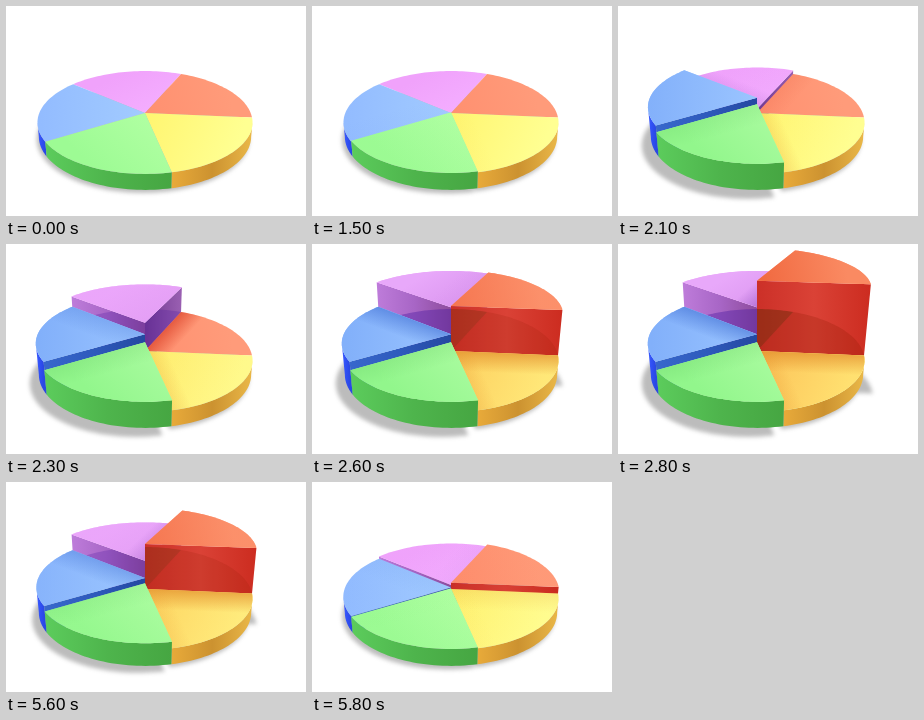
Animation, 300 px wide and 210 px high, one loop 5900 ms. Source, as an HTML page with a canvas:

```html
<!DOCTYPE html>
<html lang="en">
<head>
<meta charset="utf-8">
<title>Rising pie chart</title>
<style>
html, body { margin: 0; width: 100%; height: 100%; overflow: hidden; background: #fff; }
canvas { display: block; width: 300px; height: 210px; }
</style>
</head>
<body>
<canvas id="stage" width="300" height="210"></canvas>
<script>
const ctx = document.getElementById('stage').getContext('2d');
const LOOP = 5900, STEP = 100, RISE = 1400, STAGGER = 300, FALL = 5400, MOVE = 500;
const BASE = -14;
const VISIBLE = [190.6, 349.4]; // part of the rim that faces the viewer

// In back-to-front order. Tops run from the apex to the rim, walls from left to right.
// "behind" lists the flat sectors that show faintly through a slice's cut walls.
const slices = [
  { id: 'pink', from: 66.5, to: 139.5, lift: 42, turn: 2, shade: '#a060c8',
    rest: ['#f4adff', '#f0a2fb'], raised: ['#dc98f0', '#e8a8fa'],
    cuts: [[66.5, ['#733a92', '#9a60b2']], [139.5, ['#be7cda', '#a866c6', '#8e4c9c']]],
    behind: [['pink', '#4a1aa0', 0.4]] },
  { id: 'red', from: 355, to: 426.5, lift: 66, turn: 3, shade: '#d83c24',
    rest: ['#ff9070', '#ff9b7a'], raised: ['#f0683f', '#fa8a62'],
    cuts: [[355, ['#cc3028', '#da4236', '#cc2c20']]],
    behind: [['red', '#8c1c00', 0.24], ['pink', '#5a2800', 0.42]] },
  { id: 'yellow', from: 282, to: 355, lift: 0, shade: '#e08a28',
    rest: ['#fff570', '#ffff92'], raised: ['#fcc258', '#ffe070'],
    outer: ['#e8aa3a', '#cc9230', '#eab848'] },
  { id: 'blue', from: 139.5, to: 211.5, lift: 16.5, turn: 1, shade: '#4a78d8',
    rest: ['#a2cbff', '#93bcff'], raised: ['#9ac4ff', '#82b0fa'],
    outer: ['#3d5cff', '#3050f4', '#2a48e4'],
    cuts: [[211.5, ['#3868cc', '#2e5abc', '#2448a0']]] },
  { id: 'green', from: 211.5, to: 282, lift: 8.7, turn: 0, shade: '#5cc05c',
    rest: ['#b0ffa2', '#9dfb94'], raised: ['#a8fb9e', '#92f68c'],
    outer: ['#5ccc5c', '#4eb44c', '#46a642'] }
];
const byId = Object.fromEntries(slices.map(s => [s.id, s]));
const neighbour = (side, other, s) => slices.find(o => o[other] % 360 === s[side] % 360);

const clamp = v => Math.min(1, Math.max(0, v));
const ease = v => (1 - Math.cos(Math.PI * clamp(v))) / 2;

// Perspective view of a point on the unit disc at height z.
function project(radius, degrees, z) {
  const a = degrees * Math.PI / 180;
  const x = radius * Math.cos(a), y = radius * Math.sin(a);
  const depth = 1 + 0.184 * y - 0.0009 * z;
  return [139 + 105.7 * x / depth, 107 - (49.7 * y + z) / depth];
}

function arc(from, to, z) {
  const count = 36;
  return Array.from({ length: count + 1 }, (_, i) => project(1, from + (to - from) * i / count, z));
}

const sector = (s, z) => [project(0, 0, z), ...arc(s.from, s.to, z)];

function trace(points, dx = 0, dy = 0) {
  points.forEach(([x, y], i) => ctx[i ? 'lineTo' : 'moveTo'](x + dx, y + dy));
  ctx.closePath();
}

function paint(points, fill, alpha = 1) {
  ctx.globalAlpha = alpha;
  ctx.fillStyle = fill;
  ctx.beginPath();
  trace(points);
  ctx.fill();
  ctx.globalAlpha = 1;
}

function gradient([x0, y0], [x1, y1], colors) {
  const g = ctx.createLinearGradient(x0, y0, x1, y1);
  colors.forEach((c, i) => g.addColorStop(i / (colors.length - 1), c));
  return g;
}

// Raised slices throw their shadow outwards: the front left ones left, the red one right.
function drawShadow(p) {
  const drift = { green: [-7, 6], blue: [-7, 6], red: [12, 21] };
  ctx.save();
  ctx.filter = 'blur(2.2px)';
  ctx.fillStyle = 'rgba(70, 70, 70, 0.36)';
  ctx.beginPath();
  for (const s of slices) {
    const [dx, dy] = drift[s.id] || [0, 0];
    const amount = s.id === 'red' ? p.red : p.green;
    trace(sector(s, BASE), -2 + dx * amount, 3 + dy * amount);
  }
  ctx.fill();
  ctx.restore();
}

function drawOuterWall(s, z) {
  const from = Math.max(s.from, VISIBLE[0]), to = Math.min(s.to, VISIBLE[1]);
  const top = arc(from, to, z), bottom = arc(from, to, BASE);
  const fill = gradient([top[0][0], 0], [top[top.length - 1][0], 0], s.outer);
  paint([...top, ...bottom.reverse()], fill);
}

function drawCut(s, z, amount, angle, colors) {
  const apex = project(0, 0, z), rim = project(1, angle, z);
  const ends = [[apex[0], 0], [rim[0], 0]].sort((a, b) => a[0] - b[0]);
  const wall = [apex, rim, project(1, angle, BASE), project(0, 0, BASE)];
  paint(wall, gradient(...ends, colors));
  if (!s.behind) return;
  ctx.save();
  ctx.beginPath();
  trace(wall);
  ctx.clip();
  for (const [id, color, alpha] of s.behind) paint(sector(byId[id], 0), color, alpha * amount);
  ctx.restore();
}

// Soft shade along an edge next to a taller neighbour.
function drawContact(s, z, angle, rise) {
  if (rise <= 0) return;
  const [ax, ay] = project(0, 0, z), [rx, ry] = project(1, angle, z);
  const [mx, my] = project(1, (s.from + s.to) / 2, z);
  const length = Math.hypot(rx - ax, ry - ay);
  let nx = (ay - ry) / length, ny = (rx - ax) / length;
  if (nx * (mx - ax) + ny * (my - ay) < 0) [nx, ny] = [-nx, -ny];
  const fill = gradient([ax, ay], [ax + 20 * nx, ay + 20 * ny], [s.shade, s.shade + '00']);
  paint(sector(s, z), fill, 0.65 * clamp(rise / 25));
}

function drawSlice(s, p) {
  const amount = p[s.id], z = s.lift * amount;
  if (s.outer) drawOuterWall(s, z);
  if (s.cuts && z > 0) s.cuts.forEach(([angle, colors]) => drawCut(s, z, amount, angle, colors));
  const top = sector(s, z);
  const ends = [top[0], project(1, (s.from + s.to) / 2, z)];
  paint(top, gradient(...ends, s.rest));
  paint(top, gradient(...ends, s.raised), amount);
  const before = neighbour('from', 'to', s), after = neighbour('to', 'from', s);
  drawContact(s, z, s.from, before.lift * p[before.id] - z);
  drawContact(s, z, s.to, after.lift * p[after.id] - z);
}

function draw(time) {
  const t = Math.floor(time % LOOP / STEP) * STEP;
  const stay = 1 - ease((t - FALL) / MOVE);
  const p = {};
  for (const s of slices) {
    if (s.lift) p[s.id] = stay * ease((t - RISE - STAGGER * s.turn) / MOVE);
  }
  p.yellow = 0.3 * p.pink + 0.7 * p.red;

  ctx.clearRect(0, 0, 300, 210);
  drawShadow(p);
  for (const s of slices) drawSlice(s, p);
}

function tick() {
  draw(performance.now());
  requestAnimationFrame(tick);
}
tick();
</script>
</body>
</html>
```
